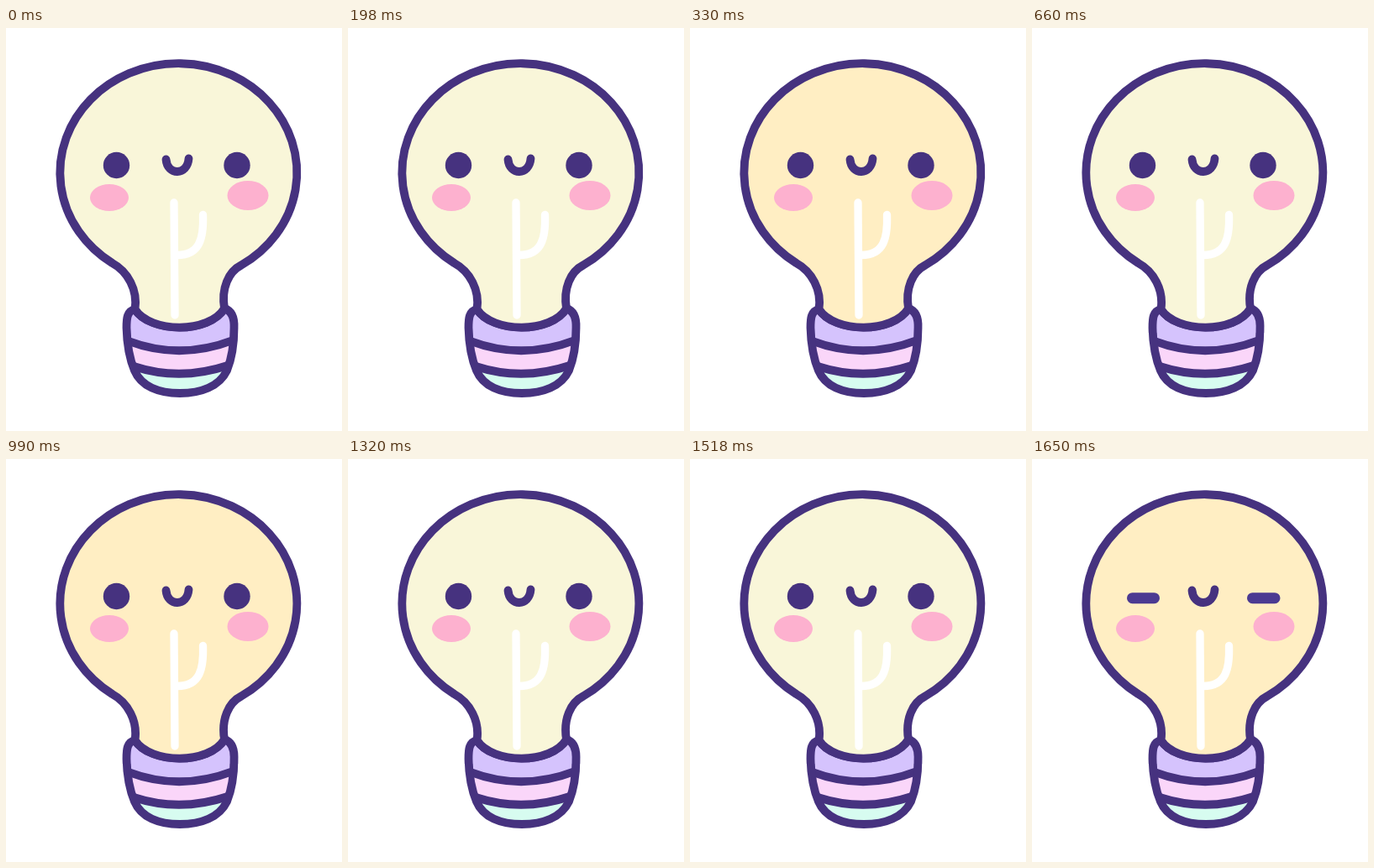
Write an HTML page that moves like this. It is 400 px wide and 480 px high and loops after 1980 ms.

```html
<!DOCTYPE html>
<html lang="en">
<head>
<meta charset="utf-8">
<title>Blinking bulb</title>
<style>
  html, body { margin: 0; height: 100%; overflow: hidden; background: #fff; }
  svg { display: block; width: 100vw; height: 100vh; }
  .line { fill: none; stroke: #46327f; stroke-width: 9.8; stroke-linecap: round; stroke-linejoin: round; }
  .glow { stroke: #fff; stroke-width: 9.3; }
  #shut { stroke: #4b3a92; stroke-width: 13; }
</style>
</head>
<body>
<svg viewBox="0 0 400 480">
  <defs>
    <path id="cap" d="M153.500 335C144 337 143.500 346 143.500 357C144 377 147 394 153 408C161 427 182 435 207 435C232 435 254 427 263 408C269 393 271.500 375 271.500 357C272 345 269 337 260 334C242 364 172 364 153.500 335Z"/>
    <clipPath id="inCap"><use href="#cap"/></clipPath>
  </defs>

  <path id="glass" d="M153.500 335C157 312 145 290 126.500 280A141 130 0 1 1 280 282.500C265 290 256 310 260 334C242 364 172 364 153.500 335Z"/>

  <g clip-path="url(#inCap)">
    <path fill="#d5c3fd" d="M130 330H285V440H130Z"/>
    <path fill="#fad6f9" d="M130 366Q207 402 285 364V440H130Z"/>
    <path fill="#d7fcf0" d="M130 394Q207 430 285 394V440H130Z"/>
  </g>
  <path class="line" d="M146 373Q207 396 270 372M152 403Q207 421 264 402"/>
  <use href="#cap" class="line"/>
  <use href="#glass" class="line"/>

  <g fill="#fdb1cf">
    <ellipse cx="123" cy="202" rx="23" ry="16"/>
    <ellipse cx="288" cy="199.500" rx="24.500" ry="17.500"/>
  </g>
  <path class="line" d="M190.500 156.500C192 176 216 176 217.500 155.500"/>
  <path class="line glow" d="M200 208L201 342M234.500 222.500C235.500 250 231 271 203 270.500"/>

  <g id="open" fill="#46327f">
    <circle cx="131.500" cy="163.500" r="15.700"/>
    <circle cx="275" cy="163.500" r="15.700"/>
  </g>
  <path id="shut" class="line" d="M119.500 165.700H145.500M262.500 165.700H289"/>
</svg>
<script>
  const STEP = 330, STEPS = 6;
  const get = id => document.getElementById(id);
  const glass = get('glass'), open = get('open'), shut = get('shut');

  function draw() {
    const step = Math.floor(performance.now() / STEP) % STEPS;
    const blink = step === STEPS - 1;
    glass.style.fill = step % 2 ? '#ffeec3' : '#f9f6d9';
    open.style.display = blink ? 'none' : '';
    shut.style.display = blink ? '' : 'none';
    requestAnimationFrame(draw);
  }
  draw();
</script>
</body>
</html>
```
